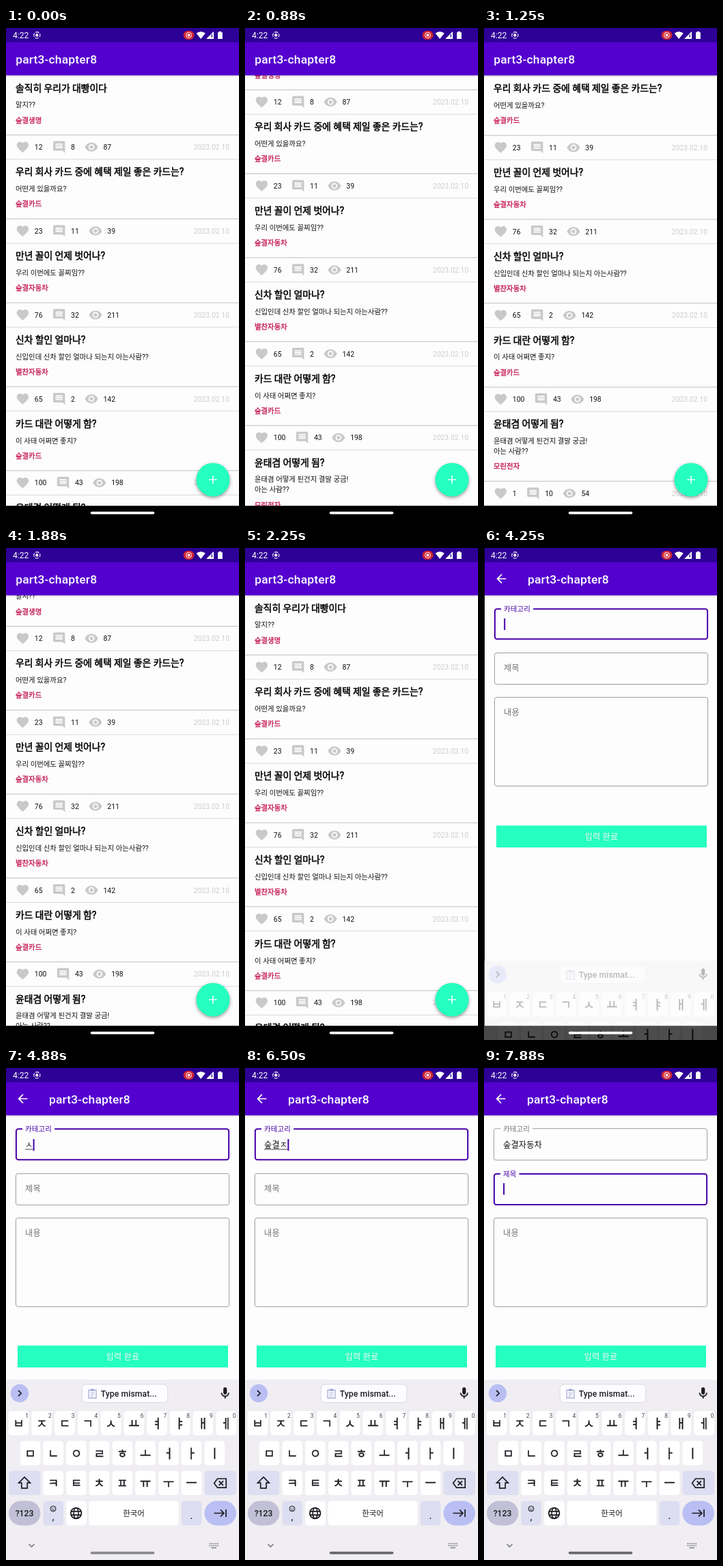
An HTML page that plays this animation: 341x720 px, repeating every 8 s.

```html
<!DOCTYPE html>
<html lang="ko">
<head>
<meta charset="utf-8">
<title>part3-chapter8</title>
<style>
html, body { margin: 0; width: 100%; height: 100%; overflow: hidden; background: #000; }
svg { display: block; width: 341px; height: 720px; }
text { font-family: Roboto, "Noto Sans CJK KR", "Noto Sans CJK", "Noto Sans CJK JP", sans-serif; white-space: pre; }
.bar { filter: drop-shadow(0 1px 1px #0003); }
.fab { filter: drop-shadow(0 2.5px 2.5px #0006); }
.field { letter-spacing: .018em; }
</style>
</head>
<body>
<svg id="stage" viewBox="0 0 341 720" xmlns="http://www.w3.org/2000/svg"></svg>
<script>
const DP = 0.868, LOOP = 8000;
const SP12 = 10.4, SP14 = 12.15, SP16 = 13.8, SP20 = 17.36;
const PURPLE = '#5400cf', DARK = '#2d0096', FOCUS = '#4700aa', MINT = '#25ffc0', PAPER = '#fdfdfd', INK = '#1c1b20';
const PALE = '#dddef1', LAVENDER = '#b9bff3';

const ICON = {
  heart: 'M12 21.35l-1.45-1.32C5.4 15.36 2 12.28 2 8.5 2 5.42 4.42 3 7.5 3c1.74 0 3.41.81 4.5 2.09C13.09 3.81 14.76 3 16.5 3 19.58 3 22 5.42 22 8.5c0 3.78-3.4 6.86-8.55 11.54z',
  chat: 'M21.99 4c0-1.1-.89-2-1.99-2H4c-1.1 0-2 .9-2 2v12c0 1.1.9 2 2 2h14l4 4zM18 14H6v-2h12zm0-3H6V9h12zm0-3H6V6h12z',
  eye: 'M12 4.5C7 4.5 2.73 7.61 1 12c1.73 4.39 6 7.5 11 7.5s9.27-3.11 11-7.5c-1.73-4.39-6-7.5-11-7.5zM12 17c-2.76 0-5-2.24-5-5s2.24-5 5-5 5 2.24 5 5-2.24 5-5 5zm0-8c-1.66 0-3 1.34-3 3s1.34 3 3 3 3-1.34 3-3-1.34-3-3-3z',
  back: 'M20 11H7.83l5.59-5.59L12 4l-8 8 8 8 1.41-1.41L7.83 13H20z',
  mic: 'M12 14c1.66 0 3-1.34 3-3V5c0-1.66-1.34-3-3-3S9 3.34 9 5v6c0 1.66 1.34 3 3 3zM17 11c0 2.76-2.24 5-5 5s-5-2.24-5-5H5c0 3.53 2.61 6.43 6 6.92V21h2v-3.08c3.39-.49 6-3.39 6-6.92z'
};

const posts = [
  ['솔직히 우리가 대빵이다', ['알지??'], '숲결생명', [12, 8, 87]],
  ['우리 회사 카드 중에 혜택 제일 좋은 카드는?', ['어떤게 있을까요?'], '숲결카드', [23, 11, 39]],
  ['만년 꼴이 언제 벗어나?', ['우리 이번에도 꼴찌임??'], '숲결자동차', [76, 32, 211]],
  ['신차 할인 얼마나?', ['신입인데 신차 할인 얼마나 되는지 아는사람??'], '별찬자동차', [65, 2, 142]],
  ['카드 대란 어떻게 함?', ['이 사태 어쩌면 좋지?'], '숲결카드', [100, 43, 198]],
  ['윤태겸 어떻게 됨?', ['윤태겸 어떻게 된건지 결말 궁금!', '아는 사람??'], '모린전자', [1, 10, 54]]
];

// Step tables: [start ms, value...]
const scrollSteps = [[0, 0], [750, 22], [880, 66], [1000, 99], [1130, 116], [1250, 122.2],
  [1630, 112], [1750, 80], [1880, 42], [2000, 16], [2130, 4], [2250, 0]];
const rippleSteps = [[0, 0], [3630, .22], [3750, .34], [3880, .15]];
// list x, page x, page opacity
const slideSteps = [[0, 0, 0, 0], [3880, -6, 26, .3], [4000, -26, 9, 1], [4130, -32, 3, 1], [4250, -34, 1, 1], [4380, -34, 0, 1]];
// keyboard y, opacity
const keyboardSteps = [[0, 264, 0], [4250, 148, .3], [4380, 24, .9], [4500, 0, 1]];
const typeSteps = [[0, ''], [4750, 'ㅅ'], [5000, '수'], [5130, '숲'], [5630, '숲ㄱ'], [5880, '숲겨'], [6250, '숲결'],
  [6500, '숲결ㅈ'], [6630, '숲결자'], [6750, '숲결잗'], [6880, '숲결자도'], [7000, '숲결자동'], [7250, '숲결자동ㅊ'], [7380, '숲결자동차']];
const focusSteps = [[0, 0], [7630, .5], [7750, .9], [7880, 1]];

const at = (steps, t) => steps.reduce((hit, s) => s[0] <= t ? s : hit).slice(1);
const mix = (a, b, p) => a + (b - a) * p;

const rect = (x, y, w, h, fill, r = 0, more = '') =>
  `<rect x="${x}" y="${y}" width="${w}" height="${h}" rx="${r}" fill="${fill}" ${more}/>`;
const text = (x, cy, s, size, fill, more = '') =>
  `<text x="${x}" y="${cy + size * .37}" font-size="${size}" fill="${fill}" ${more}>${s}</text>`;
const icon = (name, cx, cy, fill) =>
  `<path d="${ICON[name]}" fill="${fill}" transform="translate(${cx - 12 * DP} ${cy - 12 * DP}) scale(${DP})"/>`;
const line = (d, color, w = 1.5, more = '') => `<path d="${d}" fill="none" stroke="${color}" stroke-width="${w}" ${more}/>`;
const dot = (x, y, r, fill, more = '') => `<circle cx="${x}" cy="${y}" r="${r}" fill="${fill}" ${more}/>`;
const ring = (x, y, r, color, w = 1, more = '') => dot(x, y, r, 'none', `stroke="${color}" stroke-width="${w}" ${more}`);
const group = (id, body) => `<g id="${id}">${body}</g>`;
// Synthetic bold: regular glyphs with a thin outline
const heavy = (color, w) => `stroke="${color}" stroke-width="${w}"`;
const MID = 'text-anchor="middle"', MEDIUM = 'font-weight="500"';

function appBar(x) {
  return `<g class="bar">${rect(0, 20, 341, 49.3, PURPLE)}</g>` + rect(0, 0, 341, 20.8, DARK) +
    text(x, 46, 'part3-chapter8', SP20, '#fff', MEDIUM + ' letter-spacing=".0125em"');
}

function post([title, lines, team, counts], y) {
  const extra = (lines.length - 1) * 15, rule = y + 87 + extra, mid = rule + 17.8;
  let out = text(14, y + 18, title, SP16, '#000', heavy('#000', .5)) +
    lines.map((s, i) => text(14, y + 43 + i * 15, s, SP12, '#111')).join('') +
    text(14, y + 65.2 + extra, team, SP12, '#c8235a', heavy('#c8235a', .4)) +
    rect(0, rule - .6, 341, 1.2, '#c9c9c9') + rect(0, rule + 35.2, 341, 1, '#dadada');
  let x = 14;
  ['heart', 'chat', 'eye'].forEach((name, i) => {
    out += icon(name, x + 10.4, mid, '#c9c9c9') + text(x + 27.8, mid, counts[i], SP12, '#111');
    x += 41.6 + String(counts[i]).length * 5.84;
  });
  return out + text(327, mid, '2023.02.10', SP12, '#cdcdcd', 'text-anchor="end"');
}

function listScreen() {
  const rows = posts.map((p, i) => post(p, 69.5 + i * 122.8)).join('');
  return rect(0, 0, 341, 720, PAPER) + group('rows', rows) + appBar(14.2) +
    `<g class="fab">${dot(303, 661, 24.5, MINT)}</g>` + dot(303, 661, 24.5, '#fff', 'id="ripple"') +
    line('M297 661h12M303 655v12', '#f2fffa', 1.6);
}

// The outline lies inside the box, so a thicker one grows inwards
function box(y, h, label, p, focused) {
  const size = mix(SP14, SP12, p), w = label.length * size * .94, edge = focused ? 2 : .95;
  return rect(13.9 + edge / 2, y + edge / 2, 313.2 - edge, h - edge, 'none', 3.2, `stroke="${focused ? FOCUS : '#979797'}" stroke-width="${edge}"`) +
    (p ? rect(24, y - 1, (w + 8) * p, 4, PAPER) : '') +
    text(28, mix(y + 22.6, y + 1.4, p), label, size, focused ? FOCUS : '#727272', 'class="field"');
}

function form(typed, p) {
  const empty = typed ? 0 : 1, second = p > 0, end = 28 + typed.length * 11.39;
  const caret = second ? [28.1, 168.5] : [end + .2, 104 - empty];
  return box(88.2, 47.1 - empty, '카테고리', 1, !second) +
    text(28, 113, typed, SP14, '#111', 'class="field"') +
    (typed && !second ? rect(28, 118.6, end - 28, .9, '#333') : '') +
    box(154.1 - empty, 46.8, '제목', p, second) +
    box(219.1 - empty, 130.7, '내용', 0, false) +
    rect(caret[0], caret[1], 2, 17, FOCUS);
}

function writeScreen() {
  return rect(0, 0, 341, 720, PAPER) + appBar(62.9) + icon('back', 24.4, 45, '#fff') + group('form', '') +
    rect(17, 406.3, 308, 32, MINT, 1) + text(171, 423, '입력 완료', SP14, '#f1f5f3', `${MID} ${MEDIUM} class="field"`);
}

function keyboard() {
  const pitch = 33.72;
  const key = (cx, y, s) => rect(cx - 14.8, y, 29.6, 35.4, '#fff', 4.5) + text(cx, y + 18.2, s, 18, INK, `${MID} ${heavy(INK, .3)}`);
  const row = (chars, x, y) => [...chars].map((c, i) => key(x + i * pitch, y, c)).join('');
  const digits = [...'1234567890'].map((n, i) => text(30.6 + i * pitch, 508.5, n, 8.4, '#444', MID)).join('');
  const suggestion = dot(20, 476, 13.2, LAVENDER) + line('M18 471.8l4.2 4.2-4.2 4.2', INK, 1.7) +
    rect(111.3, 463, 125.4, 26.6, '#fdfcff', 6, 'stroke="#d3d2da" stroke-width=".8"') +
    line('M121 471.5h11v11.5h-11z', '#a9aed8', 1.3) + rect(123.8, 469.6, 5.4, 3.4, '#a9aed8', 1) +
    line('M123.5 475.5h6M123.5 478h6M123.5 480.4h4', '#a9aed8', .9) +
    text(138.7, 476.6, 'Type mismat...', SP14, INK, MEDIUM + ' letter-spacing=".01em"') + icon('mic', 320.7, 476, INK);
  const letters = row('ㅂㅈㄷㄱㅅㅛㅕㅑㅐㅔ', 18.6, 502) + digits +
    row('ㅁㄴㅇㄹㅎㅗㅓㅏㅣ', 35.5, 545.8) +
    row('ㅋㅌㅊㅍㅠㅜㅡ', 69.2, 589.6);
  const shift = rect(4, 589.6, 46.4, 35.4, PALE, 4.5) + line('M27 598.6l8.4 8.6h-4.2v7.6h-8.4v-7.6h-4.2z', INK, 1.7);
  const erase = rect(290.4, 589.6, 46.6, 35.4, PALE, 4.5) + line('M304.6 607.6l5-6.6h12.6v13.2h-12.6z', INK, 1.7) +
    line('M311.6 604.4l6.4 6.4M318 604.4l-6.4 6.4', INK, 1.7);
  const bottom = rect(4, 633.4, 46.4, 36, '#c1c0d6', 18) + text(27, 651.8, '?123', SP14, INK, `${MID} ${MEDIUM}`) +
    rect(54.4, 633.4, 29.6, 36, PALE, 4.5) + ring(69, 645, 4, INK) +
    dot(67.5, 644, .7, INK) + dot(70.5, 644, .7, INK) + line('M66.8 646.2q2.2 2 4.4 0', INK, .9) +
    text(69, 656, ',', 15, INK, MID) +
    rect(88.2, 633.4, 29.6, 36, '#fff', 4.5) + ring(102.6, 651.5, 7.8, INK, 1.8) +
    `<ellipse cx="102.6" cy="651.5" rx="3.5" ry="7.8" fill="none" stroke="${INK}" stroke-width="1.6"/>` +
    line('M95.6 648.9h14M95.6 654.1h14', INK, 1.6) +
    rect(121.4, 633.4, 131.2, 36, '#fff', 4.5) + text(187, 651.8, '한국어', 11.4, INK, MID) +
    rect(256.6, 633.4, 29.8, 36, PALE, 4.5) + text(271.4, 654, '.', 17, INK, MID) +
    rect(290.4, 633.4, 46.6, 36, LAVENDER, 18) + line('M304.5 651.5h14M314 646.6l4.9 4.9-4.9 4.9M322 646v11', INK, 1.7);
  const navigation = line('M33.5 696.8l4 4 4-4', '#6a6a70', 1.3) +
    line('M297.5 696h13.5M297.5 699h13.5', '#77777d', 1.5, 'stroke-dasharray="1.7 1.25"') +
    line('M300.5 702.2h7.5', '#77777d', 1.4);
  return rect(0, 456, 341, 264, '#f0eef2') + suggestion + letters + shift + erase + bottom + navigation;
}

function statusIcons() {
  return text(10, 10.8, '4:22', SP14, '#fff') +
    ring(45.3, 10.5, 4.6, '#fff', 1.1, 'stroke-dasharray="5.6 1.63" stroke-dashoffset="2.8"') + dot(45.3, 10.5, 2.2, '#fff') +
    rect(259.5, 4, 16, 13, '#cf2434', 6.5) + ring(267.5, 10.5, 4, '#fff') + dot(267.5, 10.5, 1.9, '#fff') +
    `<path d="M278.6 7.8q6.6-5.2 13.2 0L285.2 16z M304 5v11h-11z M310 6.3h1.7V5h3.4v1.3h1.7V16H310z" fill="#fff"/>` +
    rect(300.6, 9.5, 1.4, 4, DARK);
}

const stage = document.getElementById('stage');
stage.innerHTML = rect(0, 0, 341, 720, '#000') + group('list', listScreen()) + group('write', writeScreen()) +
  rect(0, 699.2, 341, 20.8, '#000') + group('keys', keyboard()) + statusIcons() +
  rect(123.7, 707.7, 93.6, 3.7, '#fff', 1.85, 'id="pill"');

const [list, rows, ripple, write, fields, keys, pill] =
  ['list', 'rows', 'ripple', 'write', 'form', 'keys', 'pill'].map(id => document.getElementById(id));
const move = (node, x, y) => node.setAttribute('transform', `translate(${x} ${y})`);
const fade = (node, a) => node.setAttribute('opacity', a);
let shown = '';

function draw(t) {
  const [listX, pageX, pageAlpha] = at(slideSteps, t);
  const [keyY, keyAlpha] = at(keyboardSteps, t);
  const [typed] = at(typeSteps, t), [focus] = at(focusSteps, t);
  move(rows, 0, -at(scrollSteps, t)[0]);
  move(list, listX, 0);
  fade(list, pageAlpha === 1 ? 0 : 1);
  fade(ripple, at(rippleSteps, t)[0]);
  move(write, pageX, 0);
  fade(write, pageAlpha);
  move(keys, 0, keyY);
  fade(keys, keyAlpha);
  pill.setAttribute('fill', t < 4380 ? '#fff' : t < 5000 ? '#8a8a8d' : '#68686b');
  const state = typed + focus;
  if (state !== shown) fields.innerHTML = form(typed, focus);
  shown = state;
}

function frame() {
  draw(performance.now() % LOOP);
  requestAnimationFrame(frame);
}
frame();
</script>
</body>
</html>
```
